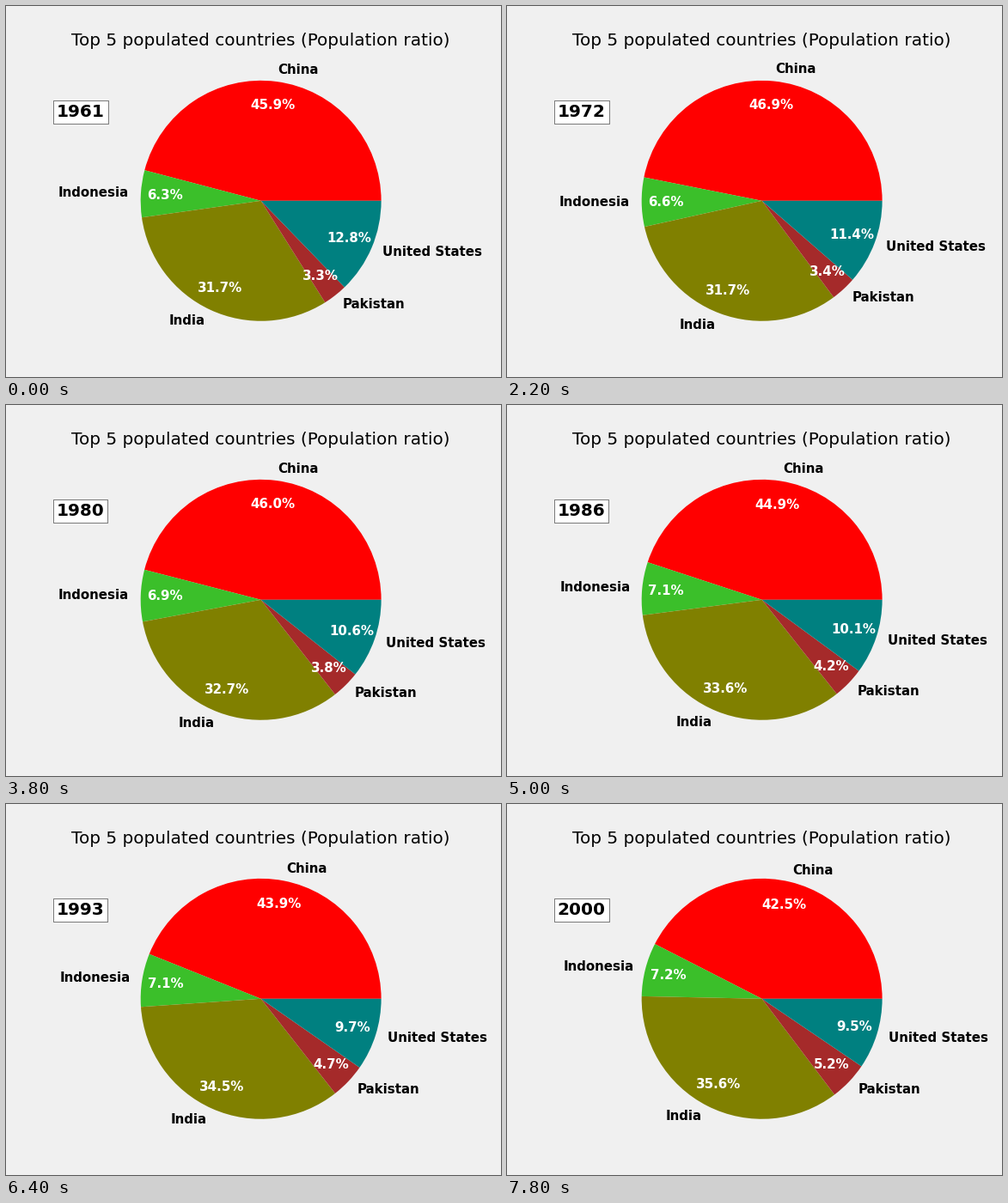
These frames come from a looping animation (576 px wide and 432 px high, 8000 ms). A matplotlib script:

```python
import matplotlib.pyplot as plt
import numpy as np
from matplotlib.animation import FuncAnimation

plt.style.use("fivethirtyeight")

YEARS = np.arange(1961, 2001)
COLORS = ["red", "#3bbf2a", "olive", "brown", "teal"]


def smooth(points):
    """Cubic Hermite curve through (year: millions) points, one value per year."""
    x, y = np.array(list(points)), np.array(list(points.values()))
    slope = np.gradient(y, x, edge_order=2)
    k = np.clip(np.searchsorted(x, YEARS, side="right") - 1, 0, len(x) - 2)
    h = x[k + 1] - x[k]
    t = (YEARS - x[k]) / h
    ease = t * t * (3 - 2 * t)
    bend = t * (1 - t) * ((1 - t) * slope[k] - t * slope[k + 1])
    return y[k] + ease * (y[k + 1] - y[k]) + h * bend


people = {
    "China": smooth({1961: 660.3, 1962: 665.8, 1963: 682.3, 1966: 735.4,
                     1969: 796.0, 1972: 862.0, 1976: 930.7, 1980: 981.2,
                     1983: 1023.3, 1986: 1066.8, 1989: 1118.6, 1993: 1178.4,
                     2000: 1262.6}),
    "Indonesia": smooth({1961: 90.8, 1970: 115.2, 1980: 148.2, 1990: 181.9,
                         2000: 213.9}),
    "India": smooth({1961: 456.4, 1970: 557.5, 1980: 696.8, 1990: 870.4,
                     2000: 1059.6}),
    "Pakistan": smooth({1961: 47.1, 1970: 59.3, 1980: 80.6, 1990: 115.4,
                        2000: 154.4}),
    "United States": smooth({1961: 183.7, 1966: 196.6, 1972: 209.9, 1980: 227.2,
                             1990: 249.6, 1993: 259.9, 2000: 282.2}),
}

fig, ax = plt.subplots(figsize=(8, 6), dpi=72)


def draw(i):
    ax.clear()
    _, _, shares = ax.pie(
        [curve[i] for curve in people.values()], labels=list(people),
        colors=COLORS, autopct="%1.1f%%", pctdistance=0.8,
        textprops=dict(fontsize=15, weight="bold"),
    )
    plt.setp(shares, color="white")
    ax.text(-1.7, 0.7, str(YEARS[i]), fontsize=20, weight="bold",
            bbox=dict(facecolor="white", edgecolor="black"))
    ax.set_title("Top 5 populated countries (Population ratio)", fontsize=20)
    return []


anim = FuncAnimation(fig, draw, frames=len(YEARS), init_func=lambda: draw(0),
                     interval=200, repeat=True, repeat_delay=0)
plt.show()
```
